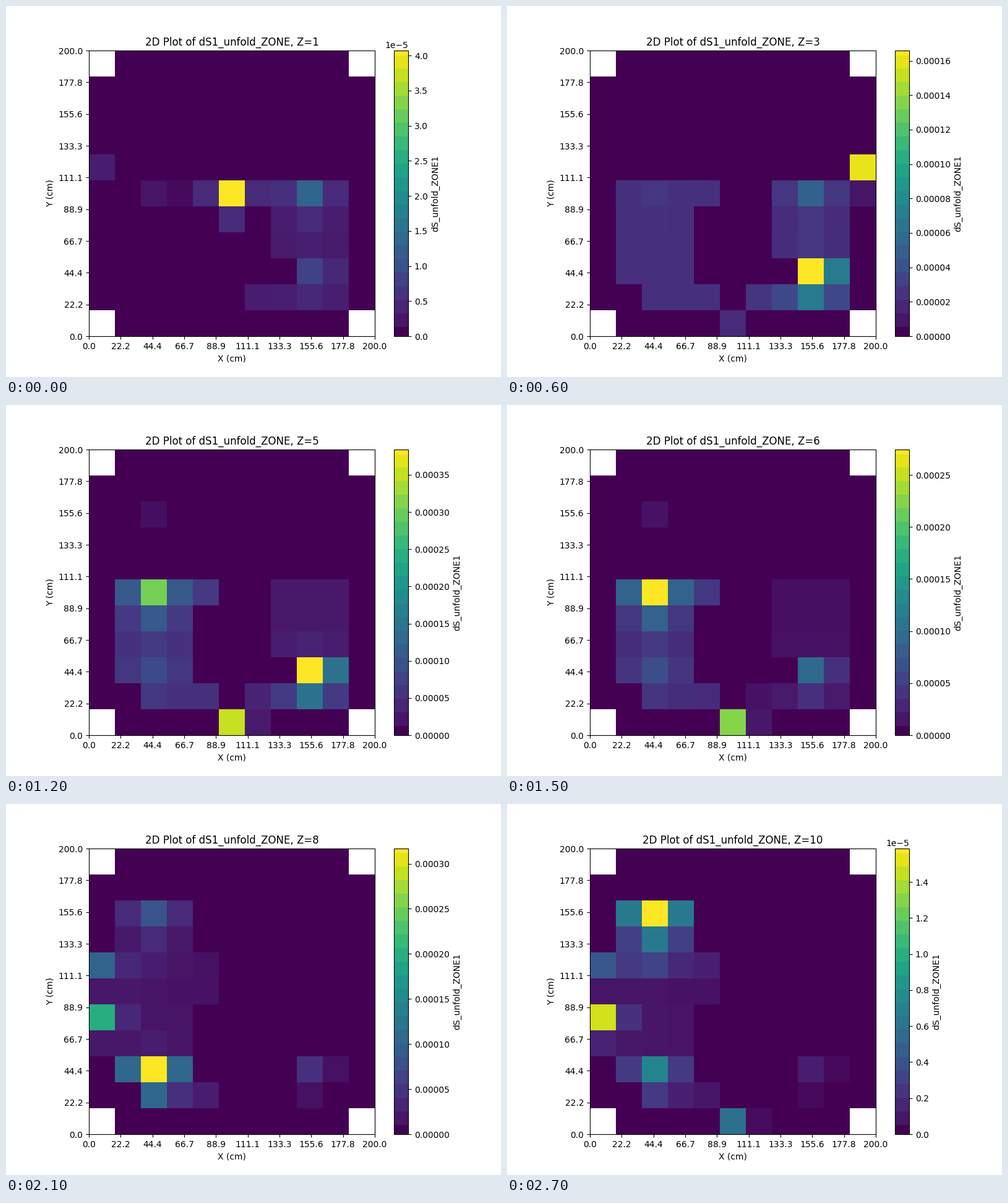
These frames come from a looping animation (800x600 px, 3 s). A matplotlib script:

```python
import matplotlib.pyplot as plt
import numpy as np
from matplotlib.animation import FuncAnimation
from matplotlib.cm import ScalarMappable
from matplotlib.colors import ListedColormap, Normalize

SIZE = 11
EXTENT = 200
PEAKS = [4.071e-5, 1.2e-4, 1.6593e-4, 5.366e-4, 3.84e-4,
         2.7435e-4, 1.0732e-4, 3.168e-4, 1.2e-4, 1.5853e-5]
VISIBLE = 2  # percent of the peak below which a cell counts as empty

viridis = plt.get_cmap("viridis")
rows, cols = np.indices((SIZE, SIZE))


def block(top, bottom, left, right):
    return (rows >= top) & (rows <= bottom) & (cols >= left) & (cols <= right)


everywhere = block(0, 10, 0, 10)
left_bank = block(5, 8, 1, 3) | block(9, 9, 2, 4) | block(5, 5, 4, 4)
right_bank = block(5, 7, 7, 9) | block(8, 8, 8, 9) | block(9, 9, 6, 9)
upper_bank = block(2, 4, 1, 3) | block(4, 4, 4, 4)
floor = block(10, 10, 5, 6)
right_edge = block(4, 5, 10, 10)


def spot(zone, row, col, falloff, heights):
    """A source fading by `falloff` per cell, faster upwards, keyed over z."""
    drop = rows - row
    distance = abs(cols - col) + np.where(drop < 0, -3 * drop, drop)
    shape = zone * falloff ** distance.astype(float)
    return shape, list(heights), list(heights.values())


spots = [
    # Even glow of each bank
    spot(left_bank, 5, 2, 1, {1: 0, 3: 14, 4: 6, 6: 12, 7: 13, 8: 5}),
    spot(right_bank, 8, 8, 1, {1: 7, 3: 12, 4: 5, 6: 4, 7: 9, 8: 0}),
    spot(upper_bank, 2, 2, 1, {6: 0, 7: 7, 8: 4, 10: 7}),
    # Hot spots inside the banks
    spot(left_bank, 5, 2, 0.22, {1: 5, 4: 0, 6: 88, 7: 48, 8: 0}),
    spot(left_bank, 8, 2, 0.3, {4: 0, 6: 11, 7: 87, 8: 95, 10: 40}),
    spot(right_bank, 8, 8, 0.33, {1: 12, 3: 88, 4: 95, 6: 30, 7: 38, 8: 14, 10: 8}),
    spot(right_bank, 5, 8, 0.2, {1: 25, 3: 19, 4: 0}),
    spot(upper_bank, 2, 2, 0.36, {4: 0, 6: 5, 7: 21, 8: 22, 10: 93}),
    # Separate sources
    spot(everywhere, 5, 5, 0.12, {1: 100, 3: 0}),
    spot(everywhere, 4, 0, 0.2, {1: 8, 3: 0, 6: 0, 8: 32, 10: 27}),
    spot(everywhere, 6, 0, 0.1, {6: 0, 7: 11, 8: 61, 10: 92}),
    spot(floor, 10, 5, 0.08, {1: 0, 3: 12, 4: 41, 6: 82, 7: 17, 8: 0, 10: 37}),
    spot(right_edge, 4, 10, 0.06, {1: 0, 3: 97, 4: 0}),
]
corners = np.isin(rows, (0, SIZE - 1)) & np.isin(cols, (0, SIZE - 1))


def level_at(z):
    level = sum(shape * np.interp(z, keys, heights)
                for shape, keys, heights in spots)
    level[level < VISIBLE] = 0
    return np.ma.masked_array(level / level.max(), corners)


def banded_colormap(steps=462):
    """Viridis in flat bands, with narrower ones at both ends."""
    edges = np.concatenate([[0], np.linspace(15, 454, 21), [steps]])
    centers = (edges[:-1] + edges[1:]) / 2 / steps
    centers[0], centers[-1] = 0, 1
    band = np.searchsorted(edges, np.arange(steps), side="right") - 1
    return ListedColormap(viridis(centers[band]))


fig, ax = plt.subplots(figsize=(8, 6), dpi=100)
norm = Normalize(0, PEAKS[0])
image = ax.imshow(level_at(1), cmap=viridis, vmin=0, vmax=1,
                  extent=(0, EXTENT, 0, EXTENT), interpolation="nearest")
scale = ScalarMappable(norm, banded_colormap())
scale.set_array([])
colorbar = fig.colorbar(scale, ax=ax, label="dS_unfold_ZONE1")

ticks = np.linspace(0, EXTENT, 10)
labels = [f"{tick:.1f}" for tick in ticks]
ax.set_xticks(ticks, labels)
ax.set_yticks(ticks, labels)
ax.set_xlabel("X (cm)")
ax.set_ylabel("Y (cm)")


def draw(frame):
    z = frame + 1
    image.set_data(level_at(z))
    norm.vmax = PEAKS[frame]
    colorbar.update_normal(scale)
    ax.set_title(f"2D Plot of dS1_unfold_ZONE, Z={z}")
    return []


animation = FuncAnimation(fig, draw, frames=len(PEAKS), interval=300,
                          repeat=True, repeat_delay=0,
                          init_func=lambda: draw(0))
plt.show()
```
